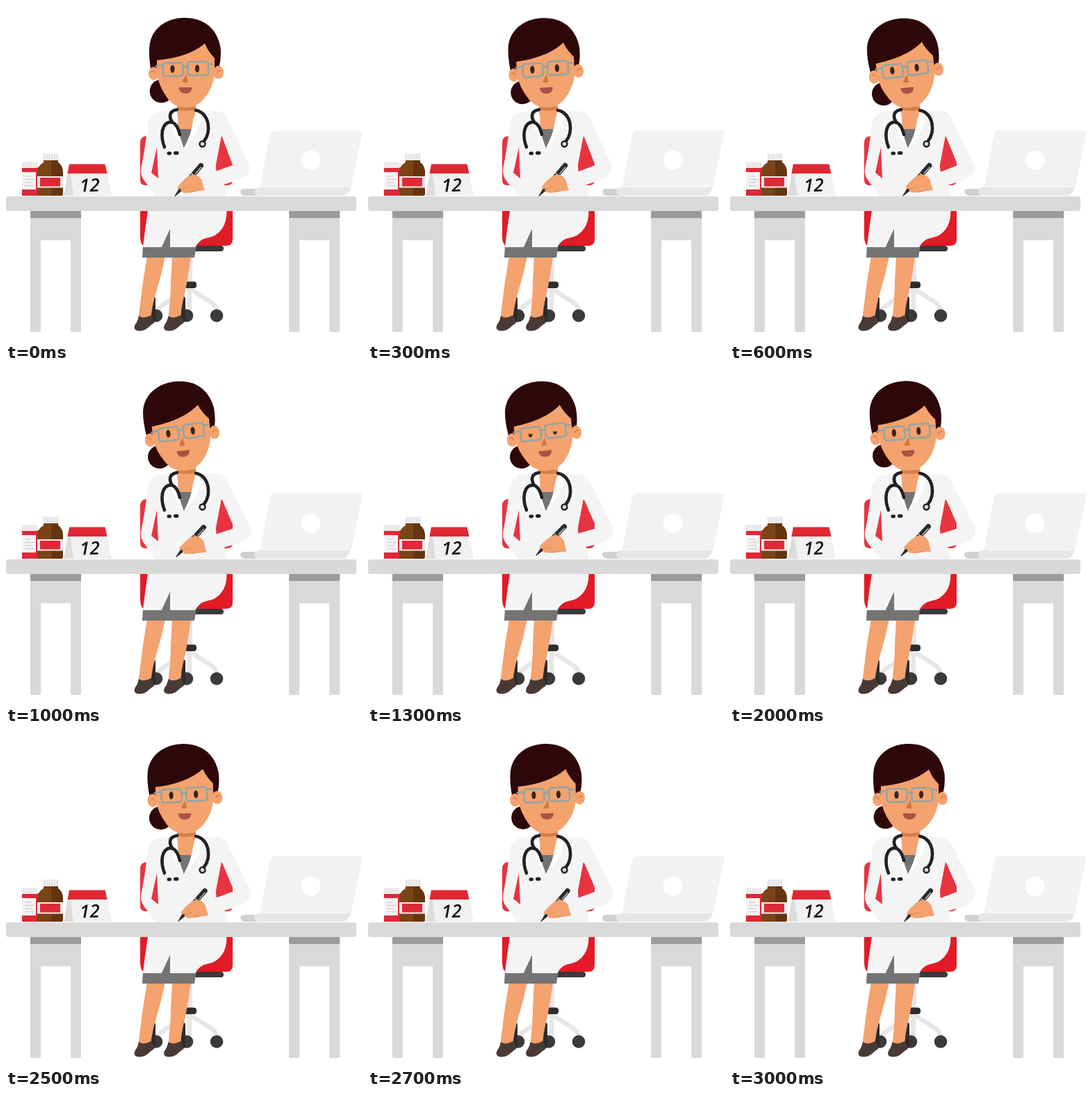
An HTML page for the animation above (3.13 s loop, 512 by 482 pixels).

```html
<!DOCTYPE html>
<html lang="en">
<head>
<meta charset="utf-8">
<title>Doctor at a desk</title>
<style>
html, body { margin: 0; width: 100%; height: 100%; overflow: hidden; background: #fff; }
svg { display: block; width: 100vw; height: 100vh; }
</style>
</head>
<body>
<svg viewBox="0 0 512 482">
  <defs>
    <g id="trestle" fill="#d9d9d9">
      <path d="M0 304H73V467Q73 469 71 469H60Q58 469 58 467V337H15V467Q15 469 13 469H2Q0 469 0 467Z"/>
      <path d="M0 294H73V305H0Z" fill="#9b9b9b"/>
    </g>
  </defs>

  <g id="chair">
    <path d="M260 352H268V412H260Z" fill="#e6e6e6"/>
    <path d="M264 404V438M268 409L296 427Q302 431 303 440M257 409L226 430Q219 434 218 440" fill="none" stroke="#e6e6e6" stroke-width="6.5"/>
    <g fill="#3a3a3b">
      <circle cx="303" cy="445.500" r="9.300"/>
      <circle cx="260" cy="445.500" r="9.300"/>
      <circle cx="216" cy="445.500" r="9.300"/>
    </g>
    <rect x="256" y="396.500" width="18" height="9.500" rx="4" fill="#2d2d2f"/>
    <rect x="255" y="345" width="58" height="8" rx="4" fill="#39393a"/>
    <path d="M193 197Q193 187 203 187H303Q326 187 326 212V250Q326 258 318 258H201Q193 258 193 250Z" fill="#e83440"/>
    <path d="M193 290H326V336Q326 345 316 345H200Q193 345 193 330Z" fill="#e31b26"/>
  </g>

  <g id="legs">
    <rect x="208.500" y="418" width="6.500" height="37" rx="3" fill="#2b2b2d"/>
    <rect x="251.500" y="418" width="6.500" height="37" rx="3" fill="#2b2b2d"/>
    <g fill="#f4a26e">
      <path d="M203 360H229Q224 385 217 408Q210 430 208 452H190Q194 420 197 397Z"/>
      <path d="M239 360H266Q262 390 257 414Q252 432 251 452H233Q237 420 237 397Z"/>
    </g>
    <path id="shoe" d="M191 446Q199 451 208 445Q213 448 213 456Q208 459 204 463Q199 467.500 191 467.500Q184.500 467 184.500 462Q185 458 188 455Q190 451 191 446Z" fill="#4a3a35"/>
    <use href="#shoe" transform="translate(42.500)"/>
    <path d="M197 344H274L271 362H196Z" fill="#747474"/>
    <path d="M205 288H317Q319 308 311 320Q303 332 288 334Q278 336 272 347H236V321L224 347H197Q199 327 205 288Z" fill="#f4f4f4"/>
    <path d="M236 321V348H223.500Z" fill="#747474"/>
  </g>

  <g id="body">
    <path d="M238 150Q222 152 214 154Q206 158 204 170Q200 205 195 230Q192 242 198 250L217 276H318L315 258Q301 248 302 228L310 186L316 158Q308 151 296 151L273 150Z" fill="#f4f4f4"/>
    <path d="M217 203L209 240L219 248Z" fill="#e83440"/>
    <path id="arm" fill="#f4f4f4"/>
    <path d="M245 174H271L256 205Z" fill="#747474"/>
    <path d="M246 138H273V153L268 177H246Q249 165 246 152Z" fill="#f4a26e"/>
    <path d="M246 145H273V149Q259 153 246 149Z" fill="#d47f49"/>
    <path d="M238 151L245 150Q246 180 256 206Q243 189 237 170Z" fill="#fff"/>
    <path d="M273 150L282 156Q278 183 255 206Q267 184 269 165Z" fill="#fff"/>
    <g fill="none" stroke="#1f2125" stroke-width="4.600" stroke-linecap="round">
      <path d="M246 149Q236 151 236 158Q236 163 239 167"/>
      <path d="M228 203Q223 191 225 179Q228 167 237 167Q246 168 250 185"/>
      <path d="M273 150Q287 153 290.500 169Q293 184 285 194"/>
      <path d="M234 212H235.500M243.500 211.500H246" stroke-width="5"/>
    </g>
    <circle cx="282.500" cy="198.500" r="4" fill="#d6d6d6" stroke="#1f2125" stroke-width="2.400"/>
  </g>

  <g id="head">
    <circle cx="223.500" cy="122.500" r="16.800" fill="#2e0708"/>
    <path d="M208 90Q205 70 206.500 57C209 33 230 17 257 17C284 17 304 32 308.500 60Q310 76 306 90Z" fill="#2e0708"/>
    <g fill="#f4a26e">
      <ellipse cx="212.500" cy="97" rx="7.500" ry="9.500"/>
      <ellipse cx="305.500" cy="95.500" rx="7.500" ry="9.500"/>
      <path d="M217 78Q262 74 286 54Q291 66 300 75L300 99Q297 119 286 132Q275 146 258 146Q241 146 231 131Q219 114 217 96Z"/>
    </g>
    <path d="M209 95Q212 92 215 97M309 94Q306 91 303 96" fill="none" stroke="#d47f49" stroke-width="1.500"/>
    <g fill="#38251f">
      <ellipse cx="239.500" cy="90.500" rx="3.100" ry="5.600"/>
      <ellipse cx="275" cy="90" rx="3.100" ry="5.600"/>
    </g>
    <g id="lids">
      <path id="lid" fill="#f4a26e"/>
      <path id="lash" fill="none" stroke="#a8653c"/>
    </g>
    <g fill="none" stroke="#94a5a2" stroke-width="2.700" transform="rotate(-1 258 91)">
      <rect x="225.500" y="81.500" width="29" height="19" rx="4"/>
      <rect x="261.500" y="80.500" width="29.500" height="19.500" rx="4"/>
      <path d="M254 89Q258 86 262 88M225 84.500L215 86M291 83.500L299 85"/>
    </g>
    <path d="M259.500 98L253 109Q257 111 261.500 109.500Z" fill="#cf763f"/>
    <path d="M248.500 117H267.500Q267 126 258 126Q249.500 126 248.500 117Z" fill="#ac5148"/>
  </g>

  <g id="desk">
    <use href="#trestle" x="35"/>
    <use href="#trestle" x="407"/>
    <rect y="274" width="504" height="21" rx="4" fill="#d9d9d9"/>
  </g>

  <g id="bottles">
    <path d="M23 232H47V273H23Z" fill="#df2938"/>
    <path d="M23 239H43V264H23Z" fill="#f4f4f4"/>
    <path d="M27 245H36M27 249.500H41M27 254H38M27 258.500H40" stroke="#d2d2d2" stroke-width="1.500"/>
    <rect x="22.500" y="224" width="23" height="9" rx="1" fill="#f0f0f0"/>
    <path d="M54 221H75V225Q82 230 82 240V270Q82 273 79 273H48Q45 273 45 270V240Q45 230 54 225Z" fill="#7b4417"/>
    <path d="M65 221H75V225Q82 230 82 240V270Q82 273 79 273H65Z" fill="#643510"/>
    <rect x="45" y="245" width="37" height="16.500" fill="#f3e9e7"/>
    <rect x="49" y="247" width="29" height="12.500" fill="#df2938"/>
    <rect x="53" y="212" width="23" height="10" rx="1" fill="#f0f0f0"/>
    <path id="ridges" fill="none" stroke="#d9d9d9"/>
  </g>

  <g id="calendar">
    <path d="M91 228L83 273H98Z" fill="#dcdcdc"/>
    <path d="M91 228H143L152 273H97Z" fill="#f1f1f1"/>
    <path d="M91 227.500H142.500L145.500 241H88.500Z" fill="#e02733"/>
    <text x="106" y="267" transform="rotate(-2 119 257)" font-family="'Open Sans', sans-serif" font-size="26" font-weight="600" font-style="italic" fill="#151515">12</text>
  </g>

  <g id="laptop">
    <path d="M343 263H370V273H345Q338 273 337 267Q337 263 343 263Z" fill="#d0d0d0"/>
    <path d="M386 179H508Q513 179 512 184L496 262H365L380 184Q381 179 386 179Z" fill="#f2f2f2"/>
    <path d="M363 261H495V263Q491 273 483 273H363Q357 273 357 266Q357 262 363 261Z" fill="#e6e6e6"/>
    <path d="M371 259.500H491" stroke="#f8f8f8" stroke-width="1.500"/>
    <circle cx="438.500" cy="222" r="14" fill="#fff"/>
  </g>

  <g id="hand">
    <path d="M256 254L281 249L285 265Q276 266 268 268Q256 270 252 265Z" fill="#e5925c"/>
    <g transform="translate(242.500 274) rotate(40.400)">
      <path d="M-.4 0L-2.200 -10L-3.600 -16V-59Q-3.400 -62 0 -62Q3.400 -62 3.600 -59V-16L2.200 -10L.4 0Z" fill="#2a2b30"/>
      <path d="M-3.600 -41H3.600M1.800 -57V-44" stroke="#d4d6d9" stroke-width="1.200"/>
    </g>
    <path d="M246.500 261Q254 250 264 244Q272 240 279 247L286 265Q277 266 267 266Q262 270 255 268.500Q250 267 252 263.500Q247 264 246.500 261Z" fill="#f4a26e"/>
    <path d="M252 263.500Q258 263 263 260" fill="none" stroke="#dd8b54"/>
  </g>
</svg>
<script>
const LOOP = 3130, STEP = 100, LAST = 3000;
const $ = id => document.getElementById(id);

// Each key: time, then the values at that time.
const TILT = [[0, 0], [600, -6], [1300, -6], [3000, 0]];
const BLINK = [[1200, 0], [1300, .55], [1400, 1], [1500, .5], [1600, 0]];
// Pen tip x, y, turn of the hand, elbow shift.
const WRITE = [
  [0, 243, 274, 0, 0], [600, 249, 273.5, .5, 1.5], [1300, 242, 268.5, 4, 3],
  [1600, 243, 268.5, 3.5, 3], [2000, 246, 269.5, 2.5, 3], [2500, 248, 272.5, .8, 2], [3000, 251, 273, 0, 3]
];

function at(keys, t) {
  const i = keys.findIndex(k => k[0] > t);
  if (i === 0) return keys[0].slice(1);
  if (i < 0) return keys[keys.length - 1].slice(1);
  const a = keys[i - 1], b = keys[i], u = (t - a[0]) / (b[0] - a[0]);
  return a.slice(1).map((v, n) => v + (b[n + 1] - v) * u);
}

function drawArm(x, y, turn, elbow) {
  const r = turn * Math.PI / 180;
  const wrist = (px, py) => {
    const dx = px - 243, dy = py - 274;
    return `${x + dx * Math.cos(r) - dy * Math.sin(r)} ${y + dx * Math.sin(r) + dy * Math.cos(r)}`;
  };
  const e = v => v + elbow;
  $('arm').setAttribute('d',
    `M300 151Q314 152 318 160L${e(348)} 225Q${e(354)} 238 ${e(343)} 246Q${e(330)} 253 ${wrist(286, 264)}` +
    `L${wrist(279, 246)}L${e(326)} 229L310 186L290 170Z`);
}

function draw(t) {
  $('head').setAttribute('transform', `rotate(${at(TILT, t)[0]} 260 150)`);

  const shut = at(BLINK, t)[0], y = 84.5 + 12 * shut;
  $('lids').style.display = shut > 0 ? '' : 'none';
  $('lid').setAttribute('d', `M235 84H244V${y}H235ZM270.500 84H279.500V${y}H270.500Z`);
  $('lash').setAttribute('d', `M236.500 ${y}H242.500M272 ${y}H278`);

  const [px, py, turn, elbow] = at(WRITE, t);
  $('hand').setAttribute('transform', `translate(${px - 243} ${py - 274}) rotate(${turn} 243 274)`);
  drawArm(px, py, turn, elbow);
}

let ridges = '';
for (let i = 0; i < 6; i++) ridges += `M${25.5 + i * 3.6} 225V232M${55.5 + i * 3.6} 213V221`;
$('ridges').setAttribute('d', ridges);

const start = performance.now();
function tick() {
  const t = (performance.now() - start) % LOOP;
  draw(Math.min(LAST, Math.floor(t / STEP) * STEP));
  requestAnimationFrame(tick);
}
tick();
</script>
</body>
</html>
```
